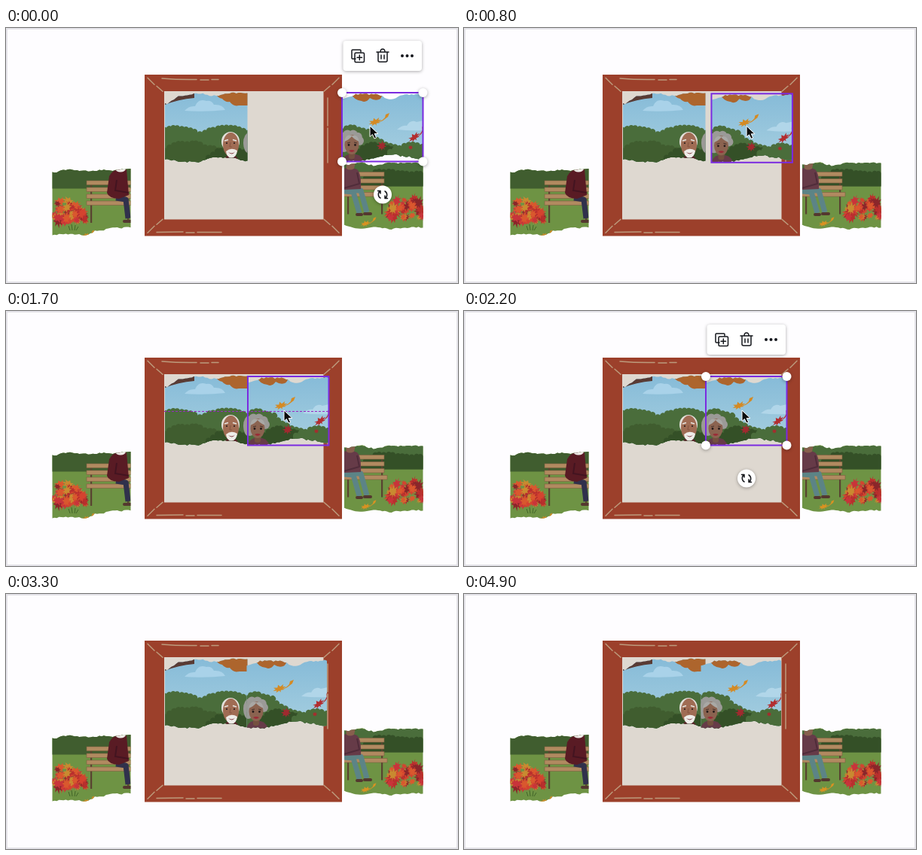
An HTML page for the animation above (5 s loop, 600 px wide and 339 px high).

```html
<!DOCTYPE html>
<html lang="en">
<head>
<meta charset="utf-8">
<title>Puzzle pieces</title>
<style>
html, body { margin: 0; width: 100%; height: 100%; overflow: hidden; background: #fefdff; }
svg { display: block; width: 100vw; height: 100vh; }
.chalk { fill: none; stroke: #bd9a7c; stroke-width: 1.5; stroke-linecap: round; }
.guide { fill: none; stroke: #9a26c4; stroke-width: 1.2; stroke-dasharray: 3 2; }
.icon { fill: none; stroke: #15171c; stroke-width: 1.5; stroke-linecap: round; stroke-linejoin: round; }
.float { fill: #fff; filter: drop-shadow(0 1px 2px #0005); }
.limb { fill: none; stroke-width: 7; stroke-linejoin: round; }
.shoe { fill: none; stroke: #54382f; stroke-width: 4; stroke-linecap: round; }
</style>
</head>
<body>
<svg viewBox="0 0 600 339" preserveAspectRatio="none">
  <defs>
    <linearGradient id="sky" x1="0" y1="0" x2="0" y2="1">
      <stop offset="0" stop-color="#86bbd8"/><stop offset="1" stop-color="#a8d0e0"/>
    </linearGradient>
    <path id="leaf" d="M0 9L-1 4L-6 6L-4 2L-9 0L-5 -2L-7 -7L-2 -4L0 -10L2 -4L7 -7L5 -2L9 0L4 2L6 6L1 4Z"/>
    <g id="drift">
      <use href="#leaf" transform="translate(-5 3) rotate(-20) scale(1 .55)"/>
      <path d="M-4 3Q3 3 8 -3L9 -7L14 -9L12 -4L8 -1Q3 4 -4 3Z"/>
    </g>
    <clipPath id="clipA"><path/></clipPath>
    <clipPath id="clipB"><path/></clipPath>
    <clipPath id="clipC"><path/></clipPath>
    <clipPath id="clipD"><path/></clipPath>
  </defs>

  <rect width="600" height="339" fill="#e4e3e8"/>
  <rect x="2" y="2" width="596" height="335" rx="1" fill="#fefdff"/>

  <rect x="184" y="62" width="262" height="214.500" fill="#9c402b"/>
  <rect x="210" y="84" width="211.500" height="170.500" fill="#ded8d0"/>
  <g class="chalk">
    <path d="M207 67Q230 69 253 68.500M258 69H269M273 68.500H282M427 93V130M427 133V179M200 271.500L235 271M239 272H250M254 271.500H286"/>
    <g id="corners"></g>
  </g>

  <!-- top left -->
  <g clip-path="url(#clipA)">
    <rect x="211" y="84" width="110" height="100" fill="url(#sky)"/>
    <path d="M237 110Q243 103 251 104Q255 93 266 97Q273 96 276 102Q287 101 291 109Q265 112 237 110Z" fill="#a9d2e9"/>
    <path d="M211 102Q228 95 250 93V84H211Z" fill="#593b34"/>
    <path d="M278 84Q279 93 287 94Q291 99 297 98Q302 105 309 103H321V84Z" fill="#ad652d"/>
    <g id="bushA"></g>
    <ellipse cx="323" cy="153" rx="8" ry="14" fill="#9b9a97"/>
    <path d="M288 184Q288 172 294 170H304Q310 173 310 184Z" fill="#5c2029"/>
    <ellipse cx="298" cy="151" rx="12" ry="13" fill="#e4e1dc"/>
    <ellipse cx="298.500" cy="155" rx="10.500" ry="16" fill="#a06c54"/>
    <path d="M292 164Q299 158 307 163Q306 172 299 173Q293 172 292 164Z" fill="#eeece8"/>
    <path d="M295 165Q300 168 304 164.500Q300 170 295 165Z" fill="#793136"/>
    <path d="M290 150L295 148.500M301 148.500L306 150" stroke="#e7e4df" stroke-width="1.500"/>
    <path d="M298 152L297 158H300" fill="none" stroke="#875440"/>
    <circle cx="293" cy="153" r="1.100" fill="#26191a"/><circle cx="303" cy="153" r="1.100" fill="#26191a"/>
  </g>

  <!-- bottom left -->
  <g clip-path="url(#clipC)">
    <rect x="61" y="182" width="105" height="100" fill="#6e9344"/>
    <g id="bushC"></g>
    <g id="benchC"></g>
    <path class="limb" d="M146 226L159 228L162 253" stroke="#30314c"/>
    <path class="shoe" d="M157 257H166"/>
    <path d="M137 197Q141 189 149 188H160L163 222L150 227Q136 226 134 219Z" fill="#591b24"/>
    <path d="M147 202L145 216L163 219" fill="none" stroke="#431420" stroke-width="2"/>
    <ellipse cx="152" cy="187" rx="7" ry="4.500" fill="#eeece8"/>
    <g id="pileC"></g>
    <path d="M85 269L83 263M88 269L87 261M91 269L92 262M93 269L96 264" stroke="#436529" fill="none"/>
    <use href="#drift" transform="translate(109 274) scale(.6)" fill="#d48a24"/>
  </g>

  <!-- bottom right -->
  <g clip-path="url(#clipD)">
    <rect x="448" y="175" width="107" height="100" fill="#6e9344"/>
    <g id="bushD"></g>
    <g id="benchD"></g>
    <path class="limb" d="M448 217L461 218L469 246M450 216L471 216L479 245" stroke="#5c8486"/>
    <path class="shoe" d="M466 248H472M476 247H484"/>
    <path d="M448 187Q458 184 466 188Q472 193 471 214L448 215Z" fill="#663b48"/>
    <path d="M466 192L469 207L448 213" fill="none" stroke="#502c3a" stroke-width="2"/>
    <path d="M451 178H464L462 187Q456 190 452 187Z" fill="#875f4d"/>
    <g id="pileD"></g>
    <use href="#drift" transform="translate(481 258) scale(.75)" fill="#d99222"/>
  </g>

  <!-- top right, dragged -->
  <g id="piece">
    <g clip-path="url(#clipB)">
      <rect width="108" height="95" fill="url(#sky)"/>
      <path d="M73 49Q80 43 86 44Q91 35 99 39L108 37V50Q90 51 73 49Z" fill="#b1d6e9"/>
      <path d="M11 -1H54Q53 8 49 9Q43 11 37 7Q32 14 26 11Q15 10 11 -1Z" fill="#ad652d"/>
      <g id="bushB"></g>
      <path d="M-1 94Q2 83 9 82H19Q27 84 30 94Z" fill="#663b48"/>
      <g id="hair" fill="#9b9a97"></g>
      <rect x="9" y="77" width="8" height="11" rx="3" fill="#74503f"/>
      <ellipse cx="13" cy="69" rx="9.500" ry="13" fill="#8b6350"/>
      <path d="M3 65Q5 54 14 57Q21 55 23 65Q16 62 13 58Q9 63 3 65Z" fill="#a9a8a5"/>
      <path d="M7 67L11 66M16 66L20 67" stroke="#45312b"/>
      <circle cx="9" cy="69.500" r="1.400" fill="#241a1a"/><circle cx="17.500" cy="69.500" r="1.400" fill="#241a1a"/>
      <path d="M9 77Q13 75 17 77Q13 81 9 77Z" fill="#9b2c37"/>
      <use href="#drift" x="49" y="36" fill="#d48a24"/>
      <use href="#leaf" transform="translate(53 71) rotate(-40) scale(.72)" fill="#a02a2f"/>
      <use href="#leaf" transform="translate(91 73) scale(.35)" fill="#a82b2d"/>
      <use href="#drift" transform="translate(100 55) rotate(-18)" fill="#b22d30"/>
    </g>
  </g>

  <g class="guide">
    <path id="guide1" d="M210 84.500H476M422 84V254"/>
    <path id="guide2" d="M210 181H425M316 84V254"/>
    <path id="guide3" d="M210 133.500H429"/>
  </g>

  <g id="select">
    <rect width="107.500" height="91.500" fill="none" stroke="#7a2be0" stroke-width="2"/>
    <g id="tools">
      <g class="float">
        <circle r="6"/><circle cx="107.500" r="6"/><circle cy="91.500" r="6"/><circle cx="107.500" cy="91.500" r="6"/>
        <circle cx="54" cy="135.500" r="12"/>
        <rect x="1.500" y="-69" width="104.500" height="40" rx="4"/>
      </g>
      <g class="icon">
        <path d="M18 -45H14Q13 -45 13 -46V-56Q13 -57 14 -57H24Q25 -57 25 -56V-54"/>
        <rect x="17" y="-53" width="12.500" height="12.500" rx="1.500"/>
        <path d="M23.300 -50V-43.500M20 -46.800H26.500"/>
        <path d="M46 -54H62M51 -54Q51 -58 54 -58Q57 -58 57 -54M48 -54V-43Q48 -41 50 -41H58Q60 -41 60 -43V-54M52 -50V-45M56 -50V-45"/>
        <path id="turn" d="M51 140A5.500 5.500 0 0 1 51 130.500H47.500M51 130.500V134"/>
        <use href="#turn" transform="rotate(180 54 135.500)"/>
      </g>
      <path d="M80 -49H94" stroke="#15171c" stroke-width="4" stroke-linecap="round" stroke-dasharray="0 6.500"/>
    </g>
  </g>

  <g id="edge">
    <path d="M321 87V180" stroke="#e3dfd9" stroke-width="2.200"/>
    <circle class="float" cx="320.500" cy="87" r="5.800"/>
    <path d="M316 177Q315 184 321 184H325" fill="none" stroke="#f4f2f0" stroke-width="2.500"/>
  </g>

  <path id="cursor" d="M0 0V14.500L3.400 11.500L6 17L8.600 15.800L6.200 10.500H11Z" fill="#0b0b0c" stroke="#fff"/>
</svg>
<script>
const $ = id => document.getElementById(id);
let seed = 7;
const rnd = () => (seed = seed * 16807 % 2147483647) / 2147483647;
const add = (id, markup) => $(id).insertAdjacentHTML("beforeend", markup);

// Points along evenly spaced heights, eased between them and jittered
function profile(x0, x1, heights, step, jitter) {
  const n = Math.round((x1 - x0) / step), last = heights.length - 1;
  return Array.from({ length: n + 1 }, (_, k) => {
    const p = k / n * last, i = Math.min(Math.floor(p), last - 1);
    const u = (1 - Math.cos((p - i) * Math.PI)) / 2;
    const y = heights[i] + (heights[i + 1] - heights[i]) * u + (rnd() - .5) * jitter;
    return `${x0 + (x1 - x0) * k / n} ${y}`;
  });
}
function tear(id, x0, x1, top, bottom) {
  const edge = [...profile(x0, x1, top, 3, 2), ...profile(x0, x1, bottom, 3, 2).reverse()];
  document.querySelector(`#${id} path`).setAttribute("d", `M${edge.join("L")}Z`);
}
function bush(id, fill, x0, x1, base, heights) {
  const pts = profile(x0, x1, heights, 6, 2);
  add(id, `<path fill="${fill}" d="M${x0} ${base}L${pts.join("A4 4 0 0 1 ")}V${base}Z"/>`);
}
function bench(id, x, y, w, posts) {
  for (const p of posts) add(id, `<rect x="${p}" y="${y + 6}" width="2.200" height="50" fill="#594331"/>`);
  for (let i = 0; i < 4; i++) {
    add(id, `<rect x="${x}" y="${y + 9 * i}" width="${w + (i > 2 ? 4 : 0)}" height="5.500" fill="#b18a60" stroke="#7d6040" stroke-width=".6"/>`);
  }
}
function pile(id, x, base, w, h, peak) {
  const tones = ["#b92f2d", "#d4432f", "#8a262a", "#d9582e", "#c98a30", "#c8343a"];
  for (let i = 0; i < 64; i++) {
    const u = rnd(), rise = u < peak ? .6 + .4 * u / peak : (1 - u) / (1 - peak) * .75 + .25;
    const y = base - rnd() * h * rise, s = .35 + rnd() * .35;
    add(id, `<use href="#leaf" fill="${tones[i % tones.length]}" transform="translate(${x + u * w} ${y}) rotate(${rnd() * 360}) scale(${s} ${s * 1.5})"/>`);
  }
}

tear("clipA", 211, 320.5, [101, 90, 87, 90, 86, 87], [174, 178, 178, 172, 172, 177]);
tear("clipB", 0.5, 107, [8, 2, 2, 8, 3, 1], [91, 91, 87, 82, 85, 88]);
tear("clipC", 61.5, 165.5, [192, 188, 190, 189, 189, 187], [275, 274, 275, 269, 266, 265]);
tear("clipD", 449, 553.5, [182, 179, 183, 179, 180, 179], [262, 267, 264, 267, 265, 265]);

const light = "#4a6d3b", mid = "#405d2f", dark = "#345027";
bush("bushA", light, 207, 325, 185, [133, 130, 132, 139, 133, 129, 131, 139]);
bush("bushA", mid, 207, 292, 185, [163, 152, 151, 157, 165]);
bush("bushA", dark, 265, 325, 185, [171, 161, 160, 165]);
bush("bushB", light, -4, 110, 95, [49, 44, 48, 60, 67, 74, 74, 76]);
bush("bushB", dark, 18, 82, 95, [76, 66, 70, 80]);
bush("bushB", light, 60, 110, 95, [79, 70, 67, 69]);
bush("bushC", mid, 56, 170, 213.5, [184, 184]);
bush("bushD", light, 444, 560, 210.5, [180, 180]);
bush("bushD", dark, 468, 560, 210.5, [202, 188, 191, 192]);
bench("benchC", 107, 203, 60, [112, 161]);
bench("benchD", 446, 191.5, 56, [453, 498]);
pile("pileC", 61, 257, 44, 35, .4);
pile("pileD", 510, 252, 46, 32, .65);

for (let i = 0; i < 6; i++) {
  add("hair", `<circle cx="${11 - 12 * Math.cos(i * .63)}" cy="${64 - 9 * Math.sin(i * .63)}" r="6"/>`);
}
add("hair", `<ellipse cx="3" cy="69" rx="8" ry="10"/>`);
for (const sx of [1, -1]) for (const sy of [1, -1]) {
  add("corners", `<path transform="translate(315 169.300) scale(${sx} ${sy})" d="M-127 -103L-118 -94M-115 -92L-107 -85"/>`);
}

// Progress from a to b, slowing down towards the end
const ease = (t, a, b) => 1 - (1 - Math.min(1, Math.max(0, (t - a) / (b - a)))) ** 1.56;
const show = (id, on) => $(id).style.display = on ? "" : "none";
const move = (id, x, y) => $(id).setAttribute("transform", `translate(${x} ${y})`);

function draw(t) {
  const nudge = Math.max(0, Math.floor((t - 2700) / 300));
  const x = 446 - 130 * ease(t, 100, 1000) + 5 * ease(t, 1300, 1600);
  const y = 86 - 2 * ease(t, 100, 500) + 5 * ease(t, 600, 1000) - 2 * ease(t, 1300, 1600);
  move("piece", x - nudge, y);
  move("select", x, y);
  move("cursor", x + 37 + 7 * ease(t, 0, 400) + 4 * ease(t, 600, 1000), y + 44 - ease(t, 0, 400) + 2 * ease(t, 1300, 1600));
  show("select", t < 2600);
  show("tools", t < 100 || t >= 2000);
  show("cursor", t < 2600);
  show("edge", t >= 2600 && t < 3000);
  show("guide1", t >= 500 && t < 700);
  show("guide2", t >= 1000 && t < 1300);
  show("guide3", t >= 1500 && t < 2000);
}
function tick() {
  draw(Math.floor(performance.now() % 5000 / 100) * 100);
  requestAnimationFrame(tick);
}
tick();
</script>
</body>
</html>
```
